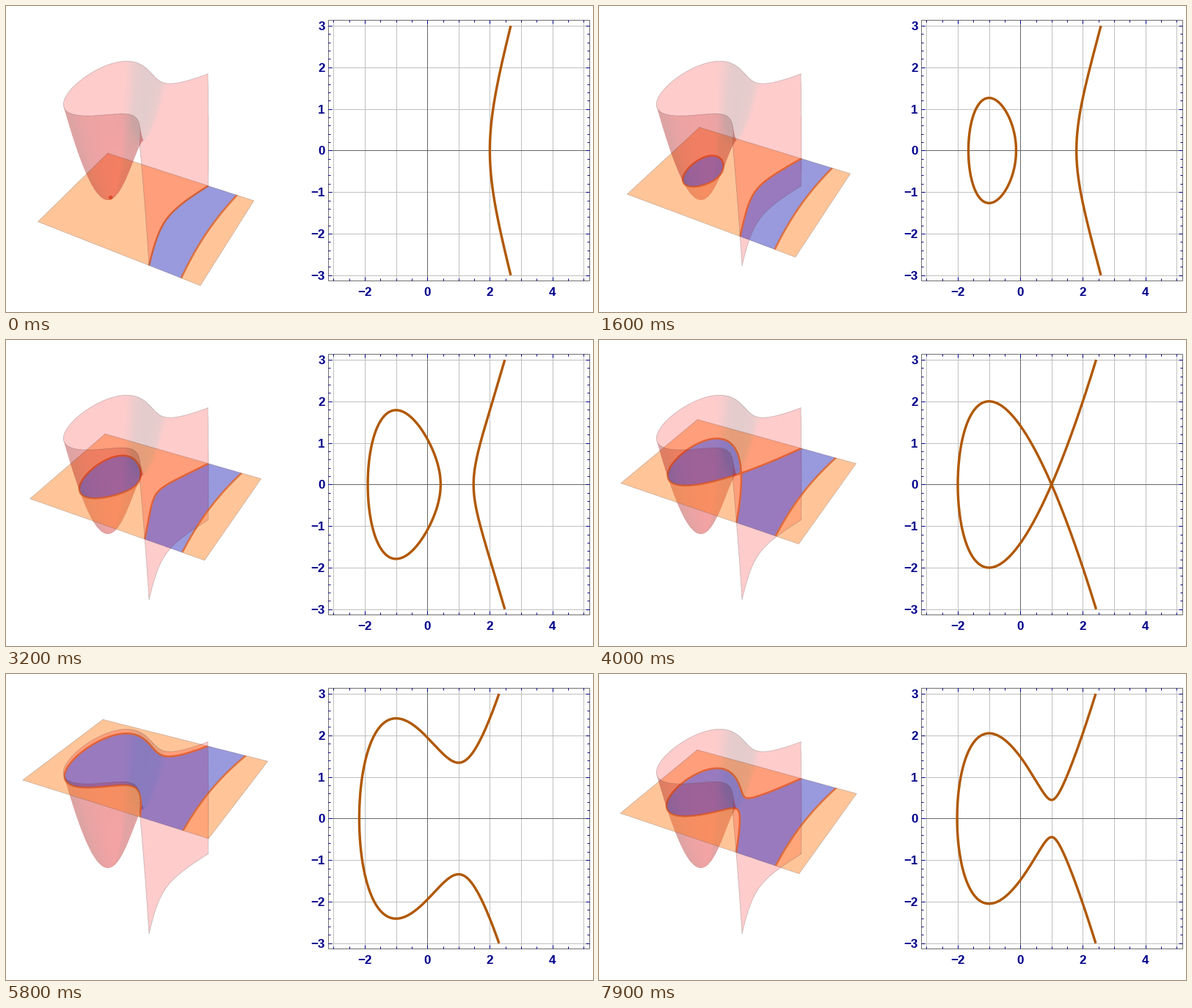
A matplotlib script that plays this animation: 800x418 px, repeating every 8 s.

```python
import numpy as np
import matplotlib.pyplot as plt
from matplotlib.animation import FuncAnimation

W, H, FRAMES = 800, 418, 80
PX = 0.72                      # one pixel in points at 100 dpi

fig = plt.figure(figsize=(W / 100, H / 100), dpi=100, facecolor="white")
ax = fig.add_axes([0, 0, 1, 1])
ax.axis("off")


def level(i):
    """Height of the cutting plane: up to 4, a short rest, then down."""
    return round(-2 + 0.1 * min(i, 121 - i), 1)


def height(x, y):
    return y * y - x ** 3 + 3 * x


def top_root(c):
    r = np.roots([1, 0, -3, c])
    return r.real[np.abs(r.imag) < 1e-5].max()


def curve(c):
    """Branches of y^2 = x^3 - 3x + c inside |y| <= 3, as (x, y) arrays."""
    r = np.roots([1, 0, -3, c])
    r = np.sort(r.real[np.abs(r.imag) < 1e-5])
    end = top_root(c - 9)
    if -2 < c < 2:
        spans = [(r[0], r[1]), (r[2], end)]
    else:
        spans = [(r[0] if c > 0 else r[-1], end)]
    ease = (1 - np.cos(np.linspace(0, np.pi, 300))) / 2
    out = []
    for lo, hi in spans:
        x = lo + (hi - lo) * ease
        y = np.sqrt(np.clip(x ** 3 - 3 * x + c, 0, 9))
        out.append((np.r_[x[::-1], x], np.r_[y[::-1], -y]))
    return out


# ---- camera ---------------------------------------------------------------
VIEW = np.array([1.3, -2.4, 2.0])
CENTRE = np.array([1.0, 0.0, 1.0])
UNIT, ZOOM, CX, CY = 8.0, 858.0, 193.7, 208.0
DIST = np.linalg.norm(VIEW)
back = VIEW / DIST
right = np.cross([0, 0, 1], back)
right /= np.linalg.norm(right)
up = np.cross(back, right)
eye = CENTRE + UNIT * VIEW


def project(x, y, z):
    x, y, z = np.broadcast_arrays(x, y, z)
    v = (np.stack([x, y, z], -1) - CENTRE) / UNIT
    k = ZOOM / (DIST - v @ back)
    return CX + k * (v @ right), CY - k * (v @ up)


# ---- rays through the 3D view, hit points with the cubic surface ------------
SS = 2
X0, X1, Y0, Y1 = 16, 364, 56, 388
gx, gy = np.meshgrid((np.arange(X0 * SS, X1 * SS) + 0.5) / SS,
                     (np.arange(Y0 * SS, Y1 * SS) + 0.5) / SS)
ray = (-back + ((gx - CX) / ZOOM)[..., None] * right
       + ((CY - gy) / ZOOM)[..., None] * up)


def trace():
    """Depth-sorted layers (far to near): height, opacity and red glow."""
    dx, dy, dz = np.moveaxis(ray, -1, 0)
    b, g = dy / dx, dz / dx
    a, e = eye[1] - b * eye[0], eye[2] - g * eye[0]
    k2, k1, k0 = -b * b, -(2 * a * b + 3 - g), e - a * a
    p = k1 - k2 ** 2 / 3
    q = 2 * k2 ** 3 / 27 - k1 * k2 / 3 + k0
    s = np.sqrt(q * q / 4 + p ** 3 / 27 + 0j)
    u = (-(q / 2 + np.where(q < 0, -1, 1) * s)) ** (1 / 3)
    turns = np.exp(2j * np.pi * np.arange(3) / 3)
    roots = np.stack([u * w - p / (3 * u * w) - k2 / 3 for w in turns])
    x = np.sort(np.where(np.abs(roots.imag) < 1e-5, roots.real, -99), axis=0)
    y, z = a + b * x, e + g * x
    hit = (x > -9) & (np.abs(y) <= 3) & (z >= -2) & (z <= 4)

    normal = np.stack([3 - 3 * x * x, 2 * y, -np.ones_like(x)], -1)
    normal /= np.linalg.norm(normal, axis=-1, keepdims=True)
    normal *= -np.sign((normal * ray).sum(-1, keepdims=True))
    light = 0.36
    for power, side, lift in ((0.54, 1, 0), (0.2, 1, 1), (0.5, 0, 1)):
        d = side * right + lift * up + back
        light = light + power * np.clip(normal @ (d / np.linalg.norm(d)), 0, 1)
    alpha = 0.2 * hit
    glow = alpha * 255 * np.minimum(light, 1)
    return [v.astype(np.float32) for v in (z, alpha, glow)]


zs, alphas, glows = trace()
ray = ray.astype(np.float32)
ORANGE = np.array([255, 110, 0], np.float32)
BLUE = np.array([0, 0, 170], np.float32)
RIM = np.array([222, 102, 46], np.float32)
GAP = 48                        # the blue band ends this far below the level


def add_surface(img, part):
    for m, a, g in zip(part, alphas, glows):
        img *= (1 - a * m)[..., None]
        img[..., 0] += g * m


def add_plane(img, c):
    t = np.float32(c - eye[2]) / ray[..., 2]
    x = np.float32(eye[0]) + t * ray[..., 0]
    y = np.float32(eye[1]) + t * ray[..., 1]
    inside = (np.abs(y) <= 3) & (x >= -3) & (x <= 5)
    f = height(x, y) - np.float32(c)
    fy, fx = np.gradient(f)
    dist = np.minimum(np.abs(f), np.abs(f + GAP)) / (np.hypot(fx, fy) + 1e-6)
    band = (f < 0) & (f > -GAP)
    sheet = (0.4 * inside)[..., None].astype(np.float32)
    img += sheet * (np.where(band[..., None], BLUE, ORANGE) - img)
    line = (0.85 * inside * np.clip(3.1 - dist, 0, 1))[..., None]
    img += line.astype(np.float32) * (RIM - img)


cache = {}


def render(c):
    if c not in cache:
        img = np.full(ray.shape, 255, np.float32)
        below = zs < c
        add_surface(img, below)
        add_plane(img, c)
        add_surface(img, ~below)
        img = sum(img[i::SS, j::SS] for i in range(SS) for j in range(SS))
        cache[c] = np.clip(img / SS ** 2 + 0.5, 0, 255).astype(np.uint8)
    return cache[c]


view = ax.imshow(render(-2.0), extent=(X0, X1, Y1, Y0), aspect="auto",
                 interpolation="nearest", zorder=1)

edge = dict(color="#605050", alpha=0.32, lw=0.8 * PX, zorder=2)
for z in (4, -2):
    for x, y in curve(z):
        ax.plot(*project(x, y, z), **edge)
sx = np.linspace(top_root(-5), top_root(-11), 30)
for y in (-3, 3):
    ax.plot(*project(sx, y, height(sx, y)), **edge)
outline, = ax.plot([], [], **edge)


# ---- flat plot --------------------------------------------------------------
L, R, T, B = 439.5, 795.5, 19.5, 375.5
NAVY = "#00008b"


def px(x):
    return 574.2 + 42.6 * x


def py(y):
    return 197.4 - 56.8 * y


def snap(v):
    """Centre of the nearest pixel."""
    return round(v) + 0.5


def rule(xs, ys, color, z=3):
    ax.plot(xs, ys, color=color, lw=PX, zorder=z, snap=False,
            solid_capstyle="butt", solid_joinstyle="miter")


def grid_style(n):
    return ("#666666", 4) if n == 0 else ("#c0c0c0", 3)


for n in range(-3, 6):
    v = snap(px(n))
    rule([v, v], [T, B], *grid_style(n))
for n in range(-3, 4):
    v = snap(py(n))
    rule([L, R], [v, v], *grid_style(n))
rule([L, R, R, L, L], [T, T, B, B, T], "#707070", z=5)

for k in range(-6, 11):
    v, size = snap(px(k / 2)), 5 if k % 4 == 0 else 3
    rule([v, v], [T, T + size], NAVY, z=6)
    rule([v, v], [B, B - size], NAVY, z=6)
for k in range(-15, 16):
    v, size = snap(py(k / 5)), 5 if k % 5 == 0 else 3
    rule([L, L + size], [v, v], NAVY, z=6)
    rule([R, R - size], [v, v], NAVY, z=6)

font = dict(family="Liberation Sans", weight="bold", size=17 * PX,
            color=NAVY, va="baseline")
for n in range(-2, 5, 2):
    ax.text(px(n), 396, str(n).replace("-", "\u2212"), ha="center", **font)
for n in range(-3, 4):
    ax.text(434.5, py(n) + 6, str(n).replace("-", "\u2212"), ha="right", **font)

graph, = ax.plot([], [], color="#b05800", lw=3.4 * PX, zorder=7,
                 solid_capstyle="butt", solid_joinstyle="round")

ax.set_xlim(0, W)
ax.set_ylim(H, 0)


def update(i):
    c = level(i)
    view.set_data(render(c))
    outline.set_data(*project([-3, 5, 5, -3, -3], [3, 3, -3, -3, 3], c))
    xs, ys = [], []
    for x, y in curve(c):
        xs += [px(x), [np.nan]]
        ys += [py(y), [np.nan]]
    graph.set_data(np.concatenate(xs), np.concatenate(ys))
    return view, outline, graph


anim = FuncAnimation(fig, update, frames=FRAMES, interval=100,
                     repeat=True, repeat_delay=0, blit=False)
plt.show()
```
